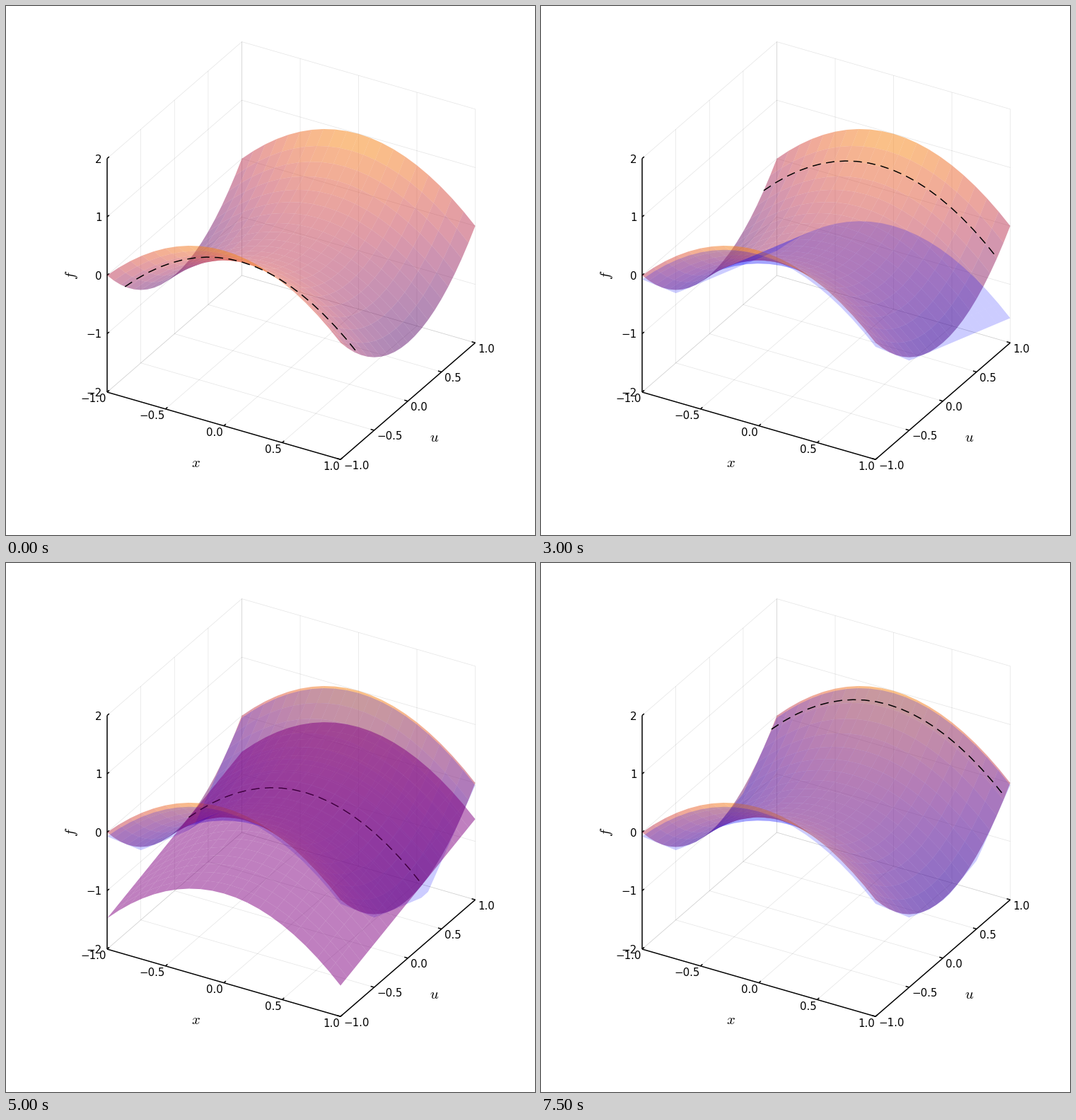
Write a matplotlib script that moves like this. It is 748 by 748 pixels and loops after 8 s.

```python
import numpy as np
import matplotlib as mpl
import matplotlib.pyplot as plt
from matplotlib.animation import FuncAnimation
from matplotlib.collections import LineCollection, PolyCollection

SIZE, DPI = 748, 100
PX = 72 / DPI
FLOOR = -2.0
CUTS = [-0.735, -0.256, 0.805, 0.213, -0.098, 0.920]
GRID = np.linspace(-1, 1, 21)
TICKS = np.linspace(-1, 1, 5)
LEVELS = np.arange(-2, 3)

mpl.rcParams.update({
    "font.family": "DejaVu Sans",
    "mathtext.fontset": "cm",
    "path.snap": False,
})

fig = plt.figure(figsize=(SIZE / DPI, SIZE / DPI), dpi=DPI, facecolor="white")
ax = fig.add_axes([0, 0, 1, 1])
ax.set(xlim=(0, SIZE), ylim=(SIZE, 0))
ax.axis("off")


def project(x, u, f):
    """Orthographic view of the box as pixel coordinates."""
    px = 143 + 165 * (x + 1) + 95.25 * (u + 1)
    py = 546 + 47.6 * (x + 1) - 82.5 * (u + 1) - 82.6 * (f + 2)
    return px, py


def saddle(x, u):
    return u**2 - x**2


def tangent(x, u, at):
    return 2 * at * u - at**2 - x**2


def clip(quad):
    """Cut a cell at the floor; only falling edges add a crossing point."""
    out = []
    for a, b in zip(quad, quad[1:] + quad[:1]):
        if b[2] >= FLOOR:
            out.append(b)
        elif a[2] >= FLOOR:
            t = (FLOOR - a[2]) / (b[2] - a[2])
            out.append(tuple(p + t * (q - p) for p, q in zip(a, b)))
    return out


def mesh(func):
    """Projected cells from back to front, with their mean heights."""
    polys, heights = [], []
    for j in range(len(GRID) - 2, -1, -1):
        u0, u1 = GRID[j], GRID[j + 1]
        for x0, x1 in zip(GRID[:-1], GRID[1:]):
            corners = [(x0, u0), (x1, u0), (x1, u1), (x0, u1)]
            quad = [(x, u, func(x, u)) for x, u in corners]
            cell = clip(quad)
            if len(cell) > 2:
                polys.append([project(*p) for p in cell])
                heights.append(np.mean([p[2] for p in quad]))
    return polys, np.array(heights)


def add_lines(segments, width, **style):
    lines = [[project(*a), project(*b)] for a, b in segments]
    ax.add_collection(LineCollection(lines, linewidths=width * PX, **style))


def add_cells(polys, color, z):
    cells = PolyCollection(polys, facecolors=color, edgecolors="none",
                           linewidths=0, zorder=z)
    ax.add_collection(cells, autolim=False)
    return cells


def draw_box():
    grid = []
    for t in TICKS:
        grid += [((t, -1, -2), (t, 1, -2)), ((t, 1, -2), (t, 1, 2)),
                 ((-1, t, -2), (1, t, -2)), ((-1, t, -2), (-1, t, 2))]
    for f in LEVELS:
        grid += [((-1, 1, f), (1, 1, f)), ((-1, -1, f), (-1, 1, f))]
    add_lines(grid, 0.75, colors=(0, 0, 0, 0.1), zorder=1)

    d = 0.03
    axes = [((-1, -1, -2), (1, -1, -2)), ((1, -1, -2), (1, 1, -2)),
            ((-1, -1, -2), (-1, -1, 2))]
    for t in TICKS:
        axes += [((t, -1, -2), (t, -1 + d, -2)), ((1, t, -2), (1 - d, t, -2))]
    for f in LEVELS:
        axes.append(((-1, -1, f), (-1, -1 + d, f)))
    add_lines(axes, 1.5, colors="black", zorder=2)


def label(text, point, dx, dy, ha):
    x, y = project(*point)
    ax.text(x + dx, y + dy, text.replace("-", "\u2212"), fontsize=15 * PX,
            ha=ha, va="baseline", zorder=2)


def draw_labels():
    for t in TICKS:
        label(f"{t:.1f}", (t, -1, -2), -1, 14.5, "right")
        label(f"{t:.1f}", (1, t, -2), 4, 13.5, "left")
    for f in LEVELS:
        label(str(f), (-1, -1, f), -7.5, 6, "right")
    for name, x, y, turn in [("x", 268.5, 646, 0), ("u", 606, 610, 0),
                             ("f", 93, 380, 90)]:
        ax.text(x, y, f"${name}$", fontsize=20.6 * PX, rotation=turn,
                ha="center", va="center", zorder=2)


draw_box()
draw_labels()

polys, heights = mesh(saddle)
colors = mpl.colormaps["inferno"]((heights + 2) / 4)
colors[:, 3] = 0.5
add_cells(polys, colors, 3)

model = add_cells([], (0, 0, 1, 0.2), 4)
curve, = ax.plot([], [], color="black", lw=1.496 * PX, ls=(0, (8, 5)),
                 dash_capstyle="butt", zorder=5)
cut = add_cells([], (0.5, 0, 0.5, 0.5), 6)


def update(i):
    # Each round: sample a control, show its tangent, merge it into the model.
    rnd, phase = divmod(i, 3)
    at = CUTS[rnd]
    known = CUTS[:rnd + (phase == 2)]

    model.set_verts(
        mesh(lambda x, u: max(tangent(x, u, c) for c in known))[0]
        if known else [])
    cut.set_verts(
        mesh(lambda x, u: tangent(x, u, at))[0] if phase == 1 else [])
    curve.set_data(*project(GRID, at, saddle(GRID, at)))
    curve.set_visible(phase < 2)
    return model, curve, cut


anim = FuncAnimation(fig, update, frames=16, interval=500, repeat=True,
                     repeat_delay=0, blit=False)
plt.show()
```
